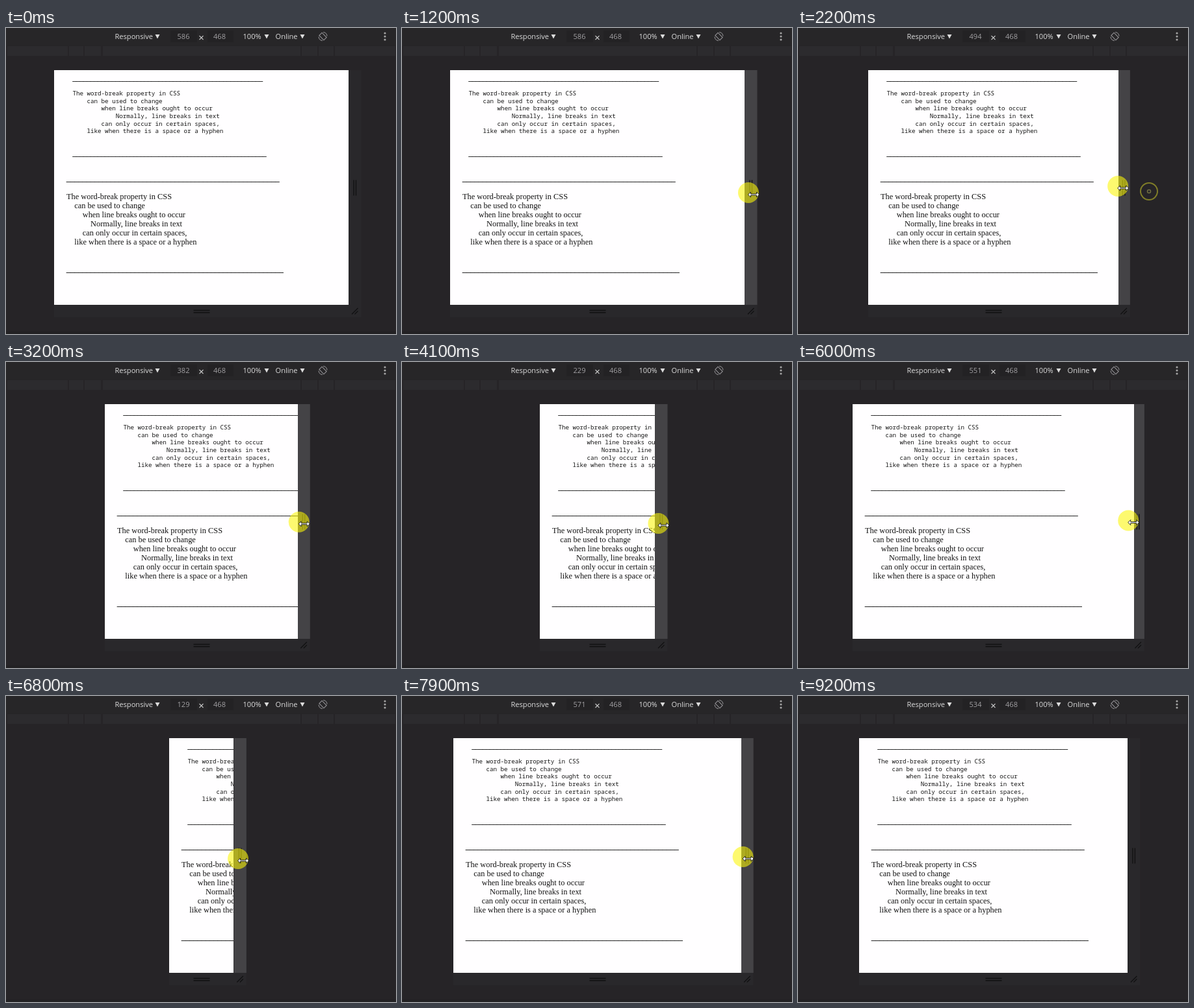
Recreate the animation shown at these times as an HTML page. Size 600 by 472 pixels, loop 9.6 s.

```html
<!DOCTYPE html>
<html lang="en">
<head>
<meta charset="utf-8">
<title>Resizing a responsive viewport</title>
<style>
  html, body { margin: 0; width: 100%; height: 100%; overflow: hidden; background: #262427; }
  svg { display: block; width: 600px; height: 472px; }
  .ui { font: 11.1px "Open Sans", "Noto Sans", sans-serif; fill: #dcdcdc; }
  .dim { fill: #a09fa2; }
  .mono { font: 9.21px "Noto Sans Mono", "DejaVu Sans Mono", monospace; fill: #161616; }
  .serif { font: 12.37px "Liberation Serif", "Noto Serif", serif; fill: #111; }
  .rule { stroke: #111; stroke-width: .4; }
  .grip { stroke: #111112; stroke-width: 1.3; fill: none; }
  .bar { fill: #29282b; }
  .bar.hover { fill: #444346; }
</style>
</head>
<body>
<svg viewBox="0 0 600 472">
  <defs>
    <clipPath id="pageClip"><rect id="clipRect" y="65" height="362"/></clipPath>
  </defs>
  <rect width="600" height="472" fill="#262427"/>
  <rect width="600" height="27" fill="#272628"/>
  <g id="ruler" fill="#2c2b2e"></g>
  <rect y="468" width="600" height="4" fill="#222123"/>

  <g fill="#232224">
    <rect x="253" y="4" width="41" height="18"/>
    <rect x="310" y="4" width="40" height="18"/>
  </g>
  <g class="ui">
    <text x="167.5" y="16.5">Responsive</text>
    <text x="273" y="16.5" text-anchor="middle" class="dim" id="widthLabel">586</text>
    <text x="328.5" y="16.5" text-anchor="middle" class="dim">468</text>
    <text x="364.5" y="16.5">100%</text>
    <text x="414.5" y="16.5">Online</text>
    <path d="M229.5 10h7l-3.5 6.5zM397.5 10h7l-3.5 6.5zM452.5 10h7l-3.5 6.5z"/>
    <path d="M297.5 12l6 6m0-6l-6 6" stroke="#c4c4c4" stroke-width="1.1"/>
    <g fill="#a5a5a5"><circle cx="583" cy="8" r="1.6"/><circle cx="583" cy="13" r="1.6"/><circle cx="583" cy="18" r="1.6"/></g>
  </g>
  <g fill="none" stroke="#929194" stroke-width="1.1">
    <rect x="484.5" y="8" width="6" height="10" transform="rotate(-45 487.5 13)"/>
    <path d="M488 6.5a6.5 6.5 0 0 1 6 6M487 19.5a6.5 6.5 0 0 1-6-6"/>
  </g>

  <rect id="bottomBar" class="bar" y="427" height="19"/>
  <path class="grip" d="M288.5 435.5h25M288.5 439h25"/>
  <rect id="gap" y="65" height="362" fill="#0c0c0d"/>
  <g id="side">
    <rect id="sideBar" class="bar" y="65" width="19.5" height="362"/>
    <path class="grip" d="M8 234.5v24M11.5 234.5v24M5 441.5l9.5-9.5M9.5 441.5l5-5"/>
  </g>
  <rect id="page" y="65" height="362" fill="#fffeff"/>
  <g clip-path="url(#pageClip)"><g id="copy"></g></g>

  <g id="ring" fill="none" stroke="#7f7d28" stroke-width="2">
    <circle id="ripple" cx="540" cy="252"/>
    <circle cx="540" cy="252" r="2.5" stroke="#6f6e42" stroke-width="1.5"/>
  </g>
  <g id="pointer">
    <circle cx="-8" cy="-3" r="16" fill="#fbf708" fill-opacity=".58"/>
    <path id="resize" d="M-8.5 0l4-4v3h9v-3l4 4-4 4v-3h-9v3z" fill="#fff" stroke="#111" stroke-width=".9"/>
    <path id="arrow" d="M0 0v13l3-2.7 2 4.7 2-.9-2-4.6h4z" fill="#fff" stroke="#111" stroke-width=".8"/>
  </g>
</svg>
<script>
const LOOP = 9600, STEP = 100, SCALE = .773, CENTER = 300.5;
const PAGE_LAG = 15, POINTER_LEAD = 45, GRIP_OFFSET = 13;
const $ = id => document.getElementById(id);
const set = (id, attrs) => {
  for (const key in attrs) $(id).setAttribute(key, attrs[key]);
};
const add = (parent, tag, attrs, text = '') => {
  const el = document.createElementNS('http://www.w3.org/2000/svg', tag);
  for (const key in attrs) el.setAttribute(key, attrs[key]);
  el.textContent = text;
  $(parent).append(el);
};

// Monotone curve through [time, value] points
function track(points) {
  const secant = points.slice(1).map((p, i) => (p[1] - points[i][1]) / (p[0] - points[i][0]));
  const slope = points.map((p, i) => {
    const a = secant[i - 1] || 0, b = secant[i] || 0;
    return a * b > 0 ? 2 * a * b / (a + b) : 0;
  });
  return t => {
    const last = points.length - 1;
    if (t <= points[0][0]) return points[0][1];
    if (t >= points[last][0]) return points[last][1];
    const i = points.findIndex(p => p[0] > t) - 1;
    const [t0, v0] = points[i], [t1, v1] = points[i + 1];
    const d = t1 - t0, u = (t - t0) / d, w = 1 - u;
    return v0 * w * w * (1 + 2 * u) + v1 * u * u * (3 - 2 * u)
      + d * u * w * (slope[i] * w - slope[i + 1] * u);
  };
}

const pageWidth = track([
  [1900, 586], [2200, 494], [2300, 472], [2900, 397], [3000, 397], [4100, 229],
  [5000, 463], [5200, 521], [5600, 645], [5700, 645], [6800, 129],
  [7600, 594], [7700, 594], [7900, 571], [8400, 534]
]);
const pointerY = track([
  [400, 434], [1200, 257], [1900, 252], [2200, 247], [4100, 252],
  [5200, 241], [6800, 254], [7900, 251], [8600, 247]
]);
const approach = track([[400, 22], [1200, 1], [1900, 0]]);
const half = t => pageWidth(t) * SCALE / 2;

for (const [from, to] of [[2, 95], [97, 119], [121, 146], [149, 453], [455, 479], [481, 504], [506, 599]])
  add('ruler', 'rect', { x: from, y: 28, width: to - from, height: 15 });

const lines = [
  [0, 'The word-break property in CSS'],
  [1, 'can be used to change'],
  [2, 'when line breaks ought to occur'],
  [3, 'Normally, line breaks in text'],
  [2, 'can only occur in certain spaces,'],
  [1, 'like when there is a space or a hyphen']
];
function addBlock(style, x, baseline, leading, indent) {
  const write = (row, text, level = 0, extra = '') =>
    add('copy', 'text', { class: style + extra, x: x + level * indent, y: baseline + row * leading }, text);
  write(-2, '_'.repeat(53), 0, ' rule');
  lines.forEach(([level, text], row) => write(row, text, level));
  write(8, '_'.repeat(54), 0, ' rule');
}
addBlock('mono', 28.4, 104, 11.65, 22.1);
addBlock('serif', 19, 264, 14, 12.37);

function draw(t) {
  const h = half(t), shown = half(t - PAGE_LAG);
  const left = Math.round(CENTER - shown), right = CENTER + h;
  const width = Math.round(CENTER + shown) - left;
  const hover = t >= 1200 && t < 8700;
  const visible = t >= 400 && t < 8700;

  $('widthLabel').textContent = Math.round(pageWidth(t));
  set('page', { x: left, width });
  set('clipRect', { x: left, width });
  set('copy', { transform: `translate(${left})` });
  set('gap', { x: CENTER, width: h });
  set('bottomBar', { x: left, width: right + 19.5 - left });
  set('side', { transform: `translate(${right})` });
  set('sideBar', { class: hover ? 'bar hover' : 'bar' });

  const x = CENTER + half(t + POINTER_LEAD) + GRIP_OFFSET + approach(t);
  set('pointer', { transform: `translate(${x} ${pointerY(t)})`, visibility: visible ? 'visible' : 'hidden' });
  set('resize', { display: hover ? 'inline' : 'none' });
  set('arrow', { display: hover ? 'none' : 'inline' });
  set('ring', { display: t >= 1900 && t < 2300 ? 'inline' : 'none' });
  set('ripple', { r: Math.min(13, 4 + (t - 1900) * .03) });
}

const start = performance.now();
function tick() {
  const t = (performance.now() - start) % LOOP;
  draw(Math.floor(t / STEP) * STEP);
  requestAnimationFrame(tick);
}
tick();
</script>
</body>
</html>
```
